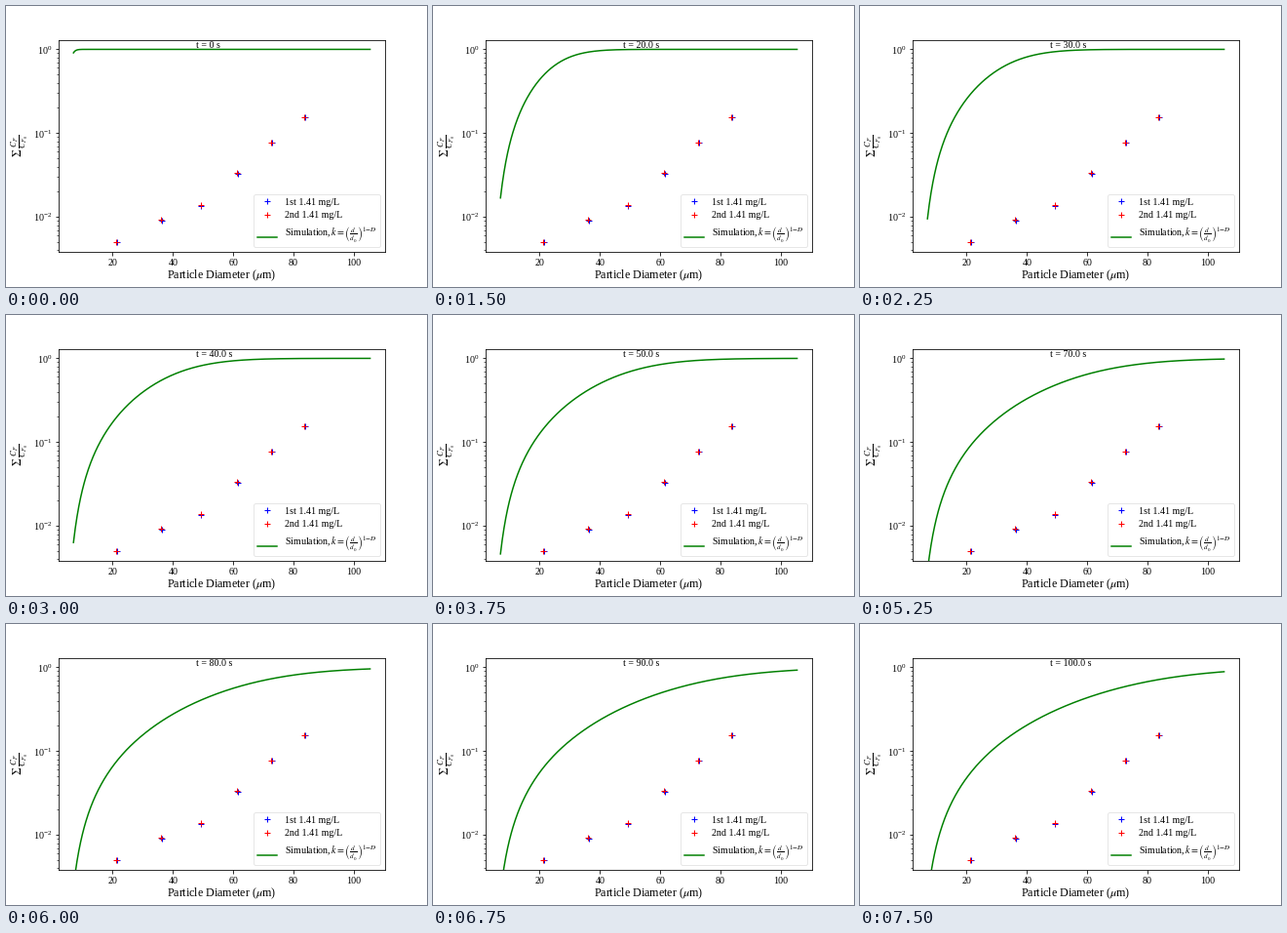
Recreate the animation shown at these times as a matplotlib script. Size 432 by 288 pixels, loop 8000 ms.

```python
import numpy as np
import matplotlib.pyplot as plt
from matplotlib.animation import FuncAnimation

plt.rcParams.update({
    "font.family": "Liberation Serif",
    "font.size": 10,
    "mathtext.fontset": "stix",
    "axes.labelsize": 12,
})

STEP_S = 10.0        # simulated seconds per step
FRAMES_PER_STEP = 3
FRAMES, INTERVAL = 32, 250

D_MIN, D_MAX = 7.0, 105.36
diam = np.linspace(D_MIN, D_MAX, 500)


def remaining(d, t):
    """Fraction of particles of diameter d left after t seconds."""
    scale = 40.3 * (max(t, 1.7) / 100) ** 0.72
    frac = np.tanh(0.217 * (d / scale) ** 1.95)
    loss = 0.61 * (D_MIN / d) ** 2.2 * (1 - frac ** 2)
    return frac * 10 ** -loss


fig = plt.figure(figsize=(6, 4), dpi=72, facecolor="white")
ax = fig.add_subplot()
fig.subplots_adjust(left=0.125, right=0.9, bottom=0.125, top=0.88)

# two nearly equal runs of the same experiment
size = np.array([21.4, 36.2, 49.4, 61.4, 72.9, 83.9])
conc = np.array([0.00497, 0.0090, 0.0136, 0.0331, 0.0764, 0.1535])
ax.plot(size, conc, "+", color="blue", label="1st 1.41 mg/L")
ax.plot(size - 0.25, conc * 1.02, "+", color="red", label="2nd 1.41 mg/L")

curve, = ax.plot(diam, remaining(diam, 0), color="green", lw=1.5,
                 label=r"Simulation,$\,k = \left(\frac{d}{d_0}\right)^{1{-}D}$")
clock = ax.text(47.55, 1.03, "t = 0 s")

ax.set_yscale("log")
ax.set_xlim(2.08, 110.28)
ax.set_ylim(10 ** -2.416, 10 ** 0.115)
ax.set_xticks(range(20, 101, 20))
ax.set_xlabel(r"Particle Diameter ($\mu$m)", labelpad=0.5)
ax.set_ylabel(r"$\Sigma\;\frac{C_P}{C_{P_0}}$", labelpad=2)

legend = ax.legend(loc="lower right", labelspacing=0.45, borderpad=0.35,
                   edgecolor="0.88")
key = legend.get_lines()[-1]
key.set_ydata(np.asarray(key.get_ydata()) - 5.5)  # sits near the baseline


def update(i):
    t = STEP_S * (i // FRAMES_PER_STEP)
    curve.set_ydata(remaining(diam, t))
    clock.set_text(f"t = {t if t else 0} s")
    return curve, clock


anim = FuncAnimation(fig, update, frames=FRAMES, interval=INTERVAL,
                     repeat=True, repeat_delay=0)
plt.show()
```
